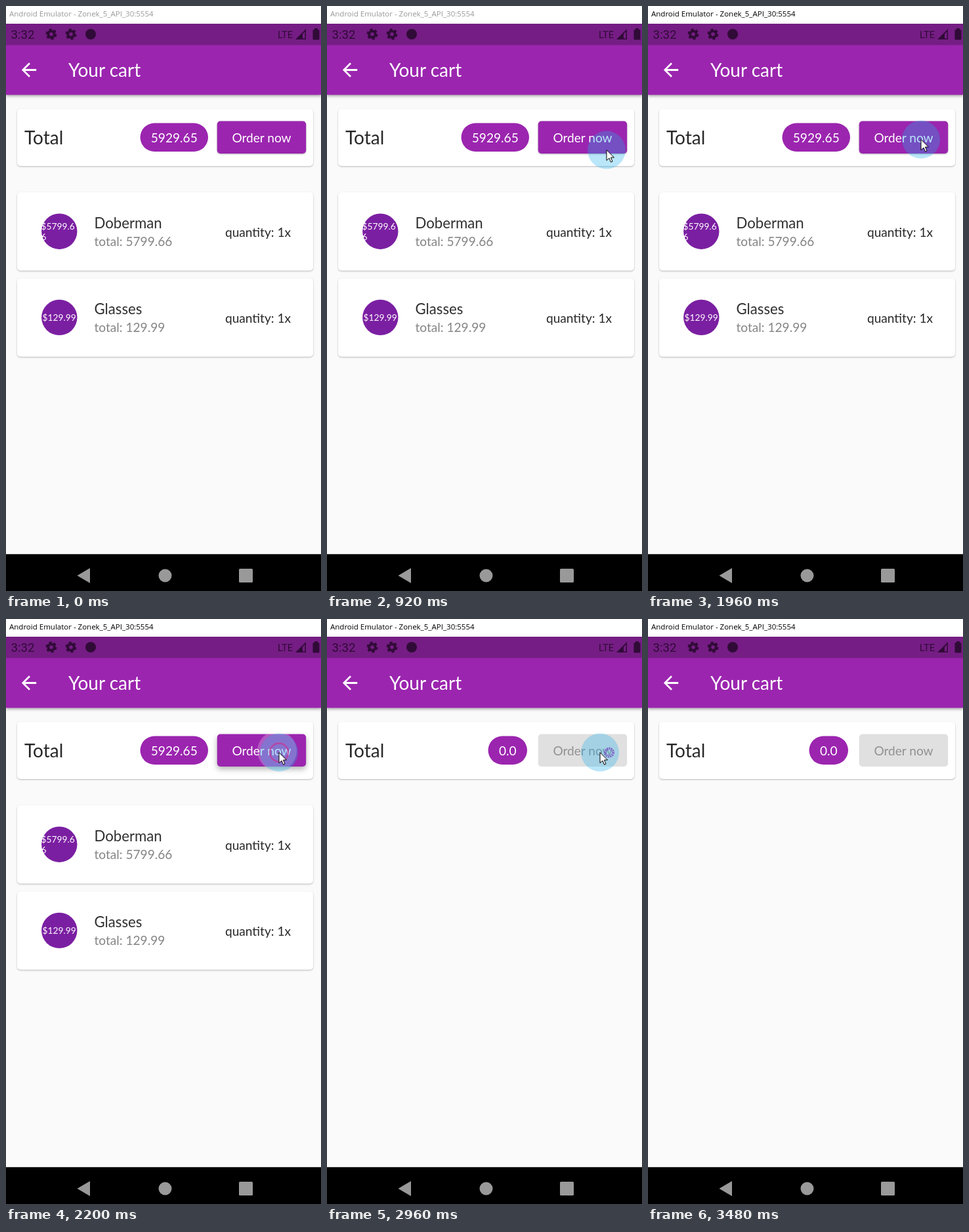
Animation, 480 px wide and 892 px high, one loop 5.32 s. Source, as an HTML page:

```html
<!DOCTYPE html>
<html lang="en">
<head>
<meta charset="utf-8">
<title>Your cart</title>
<style>
html, body { margin: 0; width: 100%; height: 100%; overflow: hidden; background: #fafafa; }
svg { display: block; width: 480px; height: 892px; font-family: Lato, sans-serif; }
.roboto { font-family: Roboto, sans-serif; }
.big { font-size: 28px; }
.mid { font-size: 22.2px; }
.small { font-size: 19.1px; }
.avatar { font-size: 13.8px; fill: #fff; }
.center { text-anchor: middle; }
.end { text-anchor: end; }
.card { fill: #fff; filter: drop-shadow(0 1px 1px #0004); }
</style>
</head>
<body>
<svg viewBox="0 0 480 892">
  <rect width="480" height="892" fill="#fafafa"/>
  <rect y="27" width="480" height="108.5" fill="#9b25af" style="filter:drop-shadow(0 2px 2px #0005)"/>
  <rect width="480" height="27" fill="#fff"/>
  <text id="caption" x="5" y="16" font-size="11.5" font-family="'Open Sans', sans-serif">Android Emulator - Zonek_5_API_30:5554</text>

  <rect y="27" width="480" height="32.5" fill="#751d84"/>
  <g class="roboto" fill="#300b37">
    <text x="7.5" y="50" font-size="18.67">3:32</text>
    <text x="414" y="49" font-size="14.8">LTE</text>
    <g id="gear" fill="none" stroke="#300b37">
      <circle cx="69" cy="43" r="4.7" stroke-width="3.8"/>
      <circle cx="69" cy="43" r="7" stroke-width="3" stroke-dasharray="4 3.33"/>
    </g>
    <use href="#gear" x="30"/>
    <circle cx="129" cy="43" r="8"/>
    <path d="M441 51L457 35V51z"/>
    <path d="M452 42.5L455.5 39V49.5H452z" fill="#751d84"/>
    <path d="M470 36V34H475V36H476Q477.5 36 477.5 37.5V50Q477.5 51.5 476 51.5H469Q467.5 51.5 467.5 50V37.5Q467.5 36 469 36z"/>
  </g>
  <path transform="translate(18.2 80.7) scale(1.4)" fill="#fff" d="M20 11H7.83l5.59-5.59L12 4l-8 8 8 8 1.41-1.41L7.83 13H20z"/>
  <text class="big" x="95" y="108" fill="#fff">Your cart</text>

  <rect class="card" x="17" y="157" width="451" height="87" rx="5"/>
  <text class="big" x="28" y="211" fill="#282828">Total</text>
  <rect id="chip" y="178.5" height="43.5" rx="21.75" fill="#9b25af"/>
  <text id="sum" class="small center" y="208" fill="#fff"></text>

  <clipPath id="clip"><rect id="clipBox" y="175.6" height="49.4" rx="5"/></clipPath>
  <rect id="button" y="175.6" height="49.4" rx="5"/>
  <text id="label" class="small center" x="389.5" y="208">Order now</text>
  <circle id="splash" cy="201" fill="#fff" clip-path="url(#clip)"/>
  <path id="spinner" fill="none" stroke="#9b25af" stroke-width="5.33" stroke-linecap="square"/>

  <g id="items"></g>

  <rect y="835.8" width="480" height="57" fill="#000"/>
  <g fill="#999">
    <path d="M108.5 868.5L128 857V880z"/>
    <circle cx="242.5" cy="868.5" r="10"/>
    <rect x="355" y="858" width="21" height="21" rx="1.5"/>
  </g>

  <g id="pointer">
    <circle r="29" fill="rgb(30,175,235)" fill-opacity=".31"/>
    <circle id="ring" fill="none" stroke="#d03090" stroke-width="2.5"/>
    <circle id="busy" cx="14" r="6" fill="none" stroke="#7a4fc4" stroke-width="4" stroke-dasharray="2 1"/>
    <path d="M0 0V16L4 12.5 6.5 18.5 9 17.5 6.5 11.5H11.5z" fill="#fff" stroke="#000"/>
  </g>
</svg>
<script>
const LOOP = 5320, STEP = 40;
const PRESS = 1960, SPIN = 2196, RELEASE = 2240, GREY = 2420, DONE = 2520;
const $ = id => document.getElementById(id);
const set = (id, attrs) => { for (const k in attrs) $(id).setAttribute(k, attrs[k]); };
const show = (id, on) => set(id, { visibility: on ? 'visible' : 'hidden' });
const clamp = x => Math.min(1, Math.max(0, x));
const mix = (a, b, p) => a + (b - a) * p;

function item(y, name, price, lines) {
  const avatar = lines.map(([text, dy, x]) =>
    `<text class="avatar" x="${x}" y="${y + dy}">${text}</text>`).join('');
  return `<rect class="card" x="17" y="${y}" width="451" height="119.5" rx="5"/>
    <circle cx="81.3" cy="${y + 59.7}" r="27.2" fill="#7b1fa2"/>${avatar}
    <text class="mid" x="134.5" y="${y + 54.5}" fill="#303030">${name}</text>
    <text class="small" x="134.5" y="${y + 81.7}" fill="#858585">total: ${price}</text>
    <text class="small end" x="434" y="${y + 67.5}" fill="#282828">quantity: 1x</text>`;
}
$('items').innerHTML =
  item(284, 'Doberman', '5799.66', [['$5799.6', 57, 53.5], ['6', 73, 53.5]]) +
  item(415.2, 'Glasses', '129.99', [['$129.99', 64.8, 55.5]]);

// Pointer stops: time, x, y
const path = [
  [720, 494, 229], [800, 463, 228], [920, 426, 219.5], [1080, 414, 211],
  [1200, 411, 207], [1240, 412, 207], [1280, 419, 206], [1320, 416, 203.5],
  [3240, 416, 203.5], [3320, 426, 206], [3400, 457, 211], [3480, 510, 213]
];

function pointerAt(t) {
  const i = path.findIndex(p => p[0] > t);
  if (i < 1) return null;
  const [a, b] = [path[i - 1], path[i]], p = (t - a[0]) / (b[0] - a[0]);
  return [mix(a[1], b[1], p), mix(a[2], b[2], p)];
}

// cubic-bezier(.4, 0, .2, 1)
function ease(x) {
  let lo = 0, hi = 1, s = .5;
  for (let i = 0; i < 20; i++) {
    s = (lo + hi) / 2;
    const bx = 1.2 * s * (1 - s) ** 2 + .6 * s * s * (1 - s) + s ** 3;
    if (bx < x) lo = s; else hi = s;
  }
  return 3 * s * s * (1 - s) + s ** 3;
}

// Indeterminate progress arc, ms since it appeared
function arc(ms) {
  const cycle = ms / 1333 % 1, TAU = 2 * Math.PI;
  const head = ease(clamp(cycle * 2)), tail = ease(clamp(cycle * 2 - 1));
  const from = TAU * (-.25 + .75 * tail + ms / 2222 + .25 * cycle);
  const sweep = Math.max(.001, TAU * .75 * (head - tail));
  const at = a => `${411 + 24 * Math.cos(a)} ${200.5 + 24 * Math.sin(a)}`;
  return `M${at(from)}A24 24 0 ${+(sweep > Math.PI)} 1 ${at(from + sweep)}`;
}

function draw(t) {
  const loading = t >= RELEASE && t < DONE, done = t >= DONE;
  set('caption', { fill: t < PRESS ? '#999' : '#000' });
  show('items', !done);

  const [chipX, chipW] = done ? [245.5, 59.5] : [loading ? 247 : 204.5, 103.5];
  set('chip', { x: chipX, width: chipW });
  set('sum', { x: chipX + chipW / 2 });
  $('sum').textContent = done ? '0.0' : '5929.65';

  const box = loading ? { x: 364, width: 93.2 } : { x: 321.7, width: 135.5 };
  set('button', { ...box, fill: t < GREY ? '#9b25af' : '#e0e0e0' });
  set('clipBox', box);
  const lift = t < RELEASE ? mix(2, 8, clamp((t - PRESS) / 200)) : 8 * clamp((GREY - t) / 200);
  $('button').style.filter = t < GREY
    ? `drop-shadow(0 ${lift / 2}px ${lift / 2}px rgba(0,0,0,.3))` : 'none';
  set('label', { fill: done ? '#919191' : '#fff' });
  show('label', !loading);

  const held = t - PRESS;
  set('splash', {
    cx: 413, r: Math.max(0, held / 8),
    opacity: held < 0 ? 0 : .24 * clamp((GREY - t) / 200)
  });
  show('spinner', loading);
  if (loading) set('spinner', { d: arc(t - SPIN) });

  const pos = pointerAt(t);
  show('pointer', pos);
  if (pos) set('pointer', { transform: `translate(${pos})` });
  set('ring', { r: Math.max(0, held * .058), opacity: held < 0 ? 0 : .65 * clamp((480 - held) / 240) });
  set('busy', { opacity: t >= 2960 && t < 3080 ? .8 : 0 });
}

const start = performance.now();
function tick() {
  const t = (performance.now() - start) % LOOP;
  draw(Math.floor(t / STEP) * STEP);
  requestAnimationFrame(tick);
}
tick();
</script>
</body>
</html>
```
